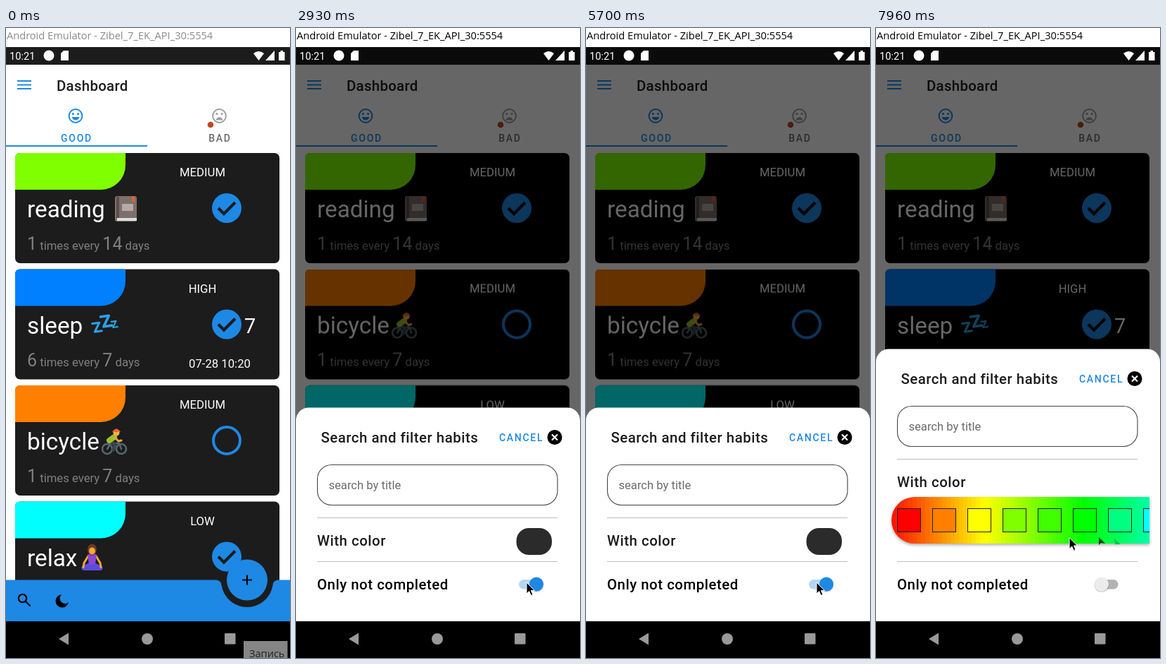
These frames come from a looping animation (404 px wide and 892 px high, 7.99 s). An HTML page:

```html
<!DOCTYPE html>
<html lang="en">
<head>
<meta charset="utf-8">
<title>Habit dashboard</title>
<style>
html, body { margin: 0; width: 100%; height: 100%; overflow: hidden; background: #fff; }
svg { display: block; width: 404px; height: 892px; font-family: Roboto, sans-serif; }
.mid { text-anchor: middle; }
.label { font-size: 16.7px; fill: #fff; }
.name { font-size: 33.3px; fill: #fff; }
.rate { font-size: 16.7px; fill: #808080; }
.rate .n { font-size: 25px; }
.caps { font-size: 14px; font-weight: 500; letter-spacing: 1.7px; }
.head { font-size: 20.4px; font-weight: 500; letter-spacing: .52px; fill: #1c1c1e; }
.desktop { font-family: 'Open Sans', sans-serif; font-size: 14.6px; }
.line { fill: none; stroke: currentColor; stroke-linecap: round; stroke-linejoin: round; }
.blue { color: #1e88e5; }
#palette { filter: drop-shadow(0 2px 2px #0005); }
#click { mix-blend-mode: multiply; }
</style>
</head>
<body>
<svg id="stage" viewBox="0 0 404 892"></svg>
<script>
const LOOP = 7990, BLUE = '#1e88e5', DARK = '#1c1c1c';
const repeat = (count, draw) => Array.from({ length: count }, (_, i) => draw(i)).join('');

const face = (x, y, mouth, color) => `<g transform="translate(${x} ${y})" color="${color}" fill="${color}">
  <circle class="line" r="9.4" stroke-width="2"/>
  <circle cx="-3.6" cy="-3" r="1.6"/><circle cx="3.6" cy="-3" r="1.6"/><path d="${mouth}"/></g>`;

const check = `<g class="blue"><circle cx="314" cy="78" r="21" fill="${BLUE}"/>
  <path class="card" d="M302 78L310 86L326 70" fill="none" stroke="${DARK}" stroke-width="4.2"/></g>`;
const ring = `<circle cx="314" cy="78" r="19" fill="none" stroke="${BLUE}" stroke-width="4"/>`;

const book = `<g transform="translate(154 60)"><rect x="1" y="1" width="31" height="36" rx="3" fill="#7d706b"/>
  <path d="M4 32H32V36H4Z" fill="#dedede"/><path d="M3 2H7V32H3Z" fill="#5a4f4b"/>
  <path d="M11 12H27V22H11Z" fill="#b5aaa5"/><path d="M25 1H29V10L27 8L25 10Z" fill="#e65f2b"/></g>`;
const zed = (x, y, size) => `<path stroke-width="${size / 3.3}" d="M${x} ${y}h${size}l${-size * .8} ${size * 1.2}h${size}"/>`;
const zzz = `<g class="line" color="#2d9fe3" transform="rotate(-8 138 78)">${zed(123, 75, 10)}${zed(136, 67, 12)}${zed(150, 76, 7)}</g>`;
const bike = `<g transform="translate(136 61)"><g class="line" color="#58666e" stroke-width="2.6">
  <circle cx="8" cy="29" r="7"/><circle cx="28" cy="29" r="7"/><path d="M8 29L13 21H25L28 29"/></g>
  <path class="line" color="#37474f" stroke-width="5" d="M11 19L19 22L17 30"/>
  <path class="line" color="#9bbf2e" stroke-width="8" d="M18 12L11 17"/>
  <path class="line" color="#f2a43c" stroke-width="3" d="M19 13L24 18L28 17"/>
  <circle cx="21" cy="6" r="4.6" fill="#f0b04a"/><path d="M15 5Q21 -4 27 5Z" fill="#f0642d"/></g>`;
const yoga = `<g transform="translate(106 61)"><path class="line" color="#5b4be0" stroke-width="7" d="M16 28L5 33H28Z"/>
  <path class="line" color="#f2a83b" stroke-width="3" d="M11 16L5 26L4 32M22 16L28 26L29 32"/>
  <path d="M10 14Q16 11 23 14L21 28H12Z" fill="#8a45d8"/>
  <ellipse cx="16.5" cy="7" rx="6.5" ry="8" fill="#6a3b22"/><ellipse cx="16.5" cy="9" rx="4.5" ry="5" fill="#f2a83b"/></g>`;

const card = (row, color, name, level, emoji, mark, times, days, extra = '') => `
<g transform="translate(0 ${177 + row * 164.5})">
  <rect class="card" x="13" width="376" height="156" rx="7" fill="${DARK}"/>
  <path d="M13 52V7Q13 0 20 0H170V17A35 35 0 0 1 135 52Z" fill="${color}"/>
  <text class="label mid" x="279.5" y="33">${level}</text>
  <text class="name" x="30" y="91">${name}</text>${emoji}${mark}
  <text class="rate" x="30" y="137"><tspan class="n">${times}</tspan> times every <tspan class="n">${days}</tspan> days</text>${extra}
</g>`;

const strips = repeat(62, i =>
  `<rect x="${22 + i * 6}" y="664" width="6.5" height="66" fill="hsl(${5 + i * 2.55} 100% 50%)"/>`);
const swatchHue = i => i < 4 ? i * 30 : i === 4 ? 105 : (i - 1) * 30;
const swatches = repeat(8, i =>
  `<rect x="${30.5 + i * 50}" y="680.5" width="33" height="33" fill="hsl(${swatchHue(i)} 100% 50%)" stroke="#222"/>`);

const rule = y => `<path d="M30 ${y}H372" stroke="#bdbdbd"/>`;

stage.innerHTML = `
<rect width="404" height="892" fill="#fff"/>
<g stroke="${BLUE}" stroke-width="2">${repeat(3, i => `<path d="M16 ${75 + i * 5.5}h20"/>`)}<path d="M0 167H201"/></g>
<text class="head" x="72" y="89" style="letter-spacing:.3px">Dashboard</text>
${face(99, 124.5, 'M-5.5 1.5H5.5Q3.8 6 0 6T-5.5 1.5', BLUE)}
${face(303.5, 124.5, 'M-5 6Q-3.6 1.8 0 1.8T5 6Z', '#9e9e9e')}
<circle cx="291" cy="137" r="4.3" fill="#bf4a1c"/>
<text class="caps mid" x="100.5" y="161" fill="${BLUE}">GOOD</text>
<text class="caps mid" x="304.5" y="161" fill="#6b6b6b">BAD</text>
${card(0, '#80ff00', 'reading', 'MEDIUM', book, check, 1, 14)}
<g id="sleep">${card(1, '#0080ff', 'sleep', 'HIGH', zzz, check, 6, 7,
  '<text class="name" x="339" y="90" style="font-size:29px">7</text><text class="label mid" x="304" y="139.5">07-28 10:20</text>')}</g>
<g id="rest">${card(2, '#ff8000', 'bicycle', 'MEDIUM', bike, ring, 1, 7)}
${card(3, '#00ffff', 'relax', 'LOW', yoga, check, 1, 7)}</g>
<path d="M0 781.5H299Q306 782 306.5 789A37 37 0 0 0 379.5 789Q380 782 387 781.5H404V840H0Z" fill="${BLUE}"/>
<circle cx="343" cy="781.5" r="29" fill="${BLUE}"/>
<path d="M336 781.5h14M343 774.5v14" stroke="#000" stroke-width="2"/>
<circle id="ripple" cx="25.5" cy="811" r="21"/>
<g class="line" color="#000" stroke-width="2.2"><circle cx="23.5" cy="807.5" r="5.7"/><path d="M28 812L34 818"/></g>
<path d="M79 802A9.3 9.3 0 1 0 89 813A7 7 0 0 1 79 802"/>
<rect y="27" width="404" height="25" fill="${DARK}"/>
<rect id="scrim" y="27" width="404" height="865"/>
<g fill="#fff">
  <text x="5" y="45" font-size="14.6">10:21</text>
  <circle cx="61" cy="39" r="7.5"/>
  <path d="M82 32H89V46H78V36Z"/>
  <path d="M352 36Q359.5 30 367 36L359.5 46Z"/><path d="M382 32V46H369Z"/>
  <path d="M388 34H390.5V32H394V34H396.5V46H388Z"/>
</g>
<rect y="840" width="404" height="52"/>
<g fill="#999"><path d="M75 865L89 856.5V873.5Z"/><circle cx="201" cy="865" r="8"/><rect x="311" y="857" width="15.5" height="15.5" rx="1"/></g>

<g id="sheet">
  <rect y="565" width="404" height="275" fill="#fff"/>
  <g id="upper">
    <rect y="537.5" width="404" height="200" rx="18" fill="#fff"/>
    <text class="head" x="35.5" y="587">Search and filter habits</text>
    <text class="caps" x="289" y="585" fill="${BLUE}">CANCEL</text>
    <circle cx="368" cy="579.5" r="10.5"/>
    <path d="M364 575.5l8 8m0-8l-8 8" stroke="#fff" stroke-width="2.2"/>
    <rect x="30.5" y="618.5" width="341.5" height="57" rx="20" fill="#fff" stroke="#444" stroke-width="1.1"/>
    <text x="46.5" y="653" font-size="16.6" fill="#6b6b6b">search by title</text>
    ${rule(693.5)}
    <text class="head" x="30" y="733">With color</text>
  </g>
  <rect id="pill" x="313.5" y="708" width="50.5" height="38" rx="18" fill="#2b2b2b"/>
  <clipPath id="bar"><path d="M389 664H55A33 33 0 0 0 55 730H389Z"/></clipPath>
  <g id="palette"><g clip-path="url(#bar)">${strips}${swatches}</g></g>
  ${rule(755.5)}
  <text class="head" x="30" y="795" style="fill:#000">Only not completed</text>
  <rect id="track" x="317" y="781" width="27.5" height="13.5" rx="6.75" fill="#b2b2b2"/>
  <g id="thumb"><circle cx="321" cy="788.5" r="10.5" opacity=".18"/><circle id="knob" cx="321" cy="787.5" r="10"/></g>
</g>

<g id="ghosts"><path d="M317 721l9 9l-6-1l-3 3Z" fill="#0a3d16"/><path d="M339 723l9 8h-8Z" fill="#0bc257"/></g>
<g id="tip"><rect x="338" y="868" width="62.5" height="24" fill="#858585"/>
  <text class="desktop" x="346" y="891" fill="#222">Запись</text></g>
<path id="cursor" d="M0 0V16L3.7 12.5L6.3 18.5L9 17.3L6.4 11.5H11.3Z" stroke="#fff"/>
<circle id="click" cx="-1" cy="-1" r="15" fill="#f8ef62"/>
<rect width="404" height="27" fill="#fff"/>
<text id="title" class="desktop" x="1" y="16">Android Emulator - Zibel_7_EK_API_30:5554</text>`;

// Each move is [start ms, duration ms, value, easing]; values hold in between.
function play(selector, prop, first, moves) {
  const frames = [{ offset: 0, [prop]: first }];
  let last = first;
  for (const [start, span, value, easing = 'linear'] of moves) {
    frames.push({ offset: start / LOOP, [prop]: last, easing }, { offset: (start + span) / LOOP, [prop]: value });
    last = value;
  }
  frames.push({ offset: 1, [prop]: last });
  for (const el of document.querySelectorAll(selector)) {
    el.animate(frames, { duration: LOOP, iterations: Infinity });
  }
}
const at = (x, y) => `translate(${x}px, ${y}px)`;

play('#title', 'fill', '#8a8a8a', [[40, 0, '#000']]);
play('#tip', 'opacity', 1, [[90, 0, 0]]);

const OPEN = 1080, EXPAND = 7490;
play('#ripple', 'opacity', 0, [[940, 100, .15], [1200, 200, 0]]);
play('#scrim', 'opacity', 0, [[OPEN, 350, .6, 'ease-in']]);
play('rect.card', 'fill', DARK, [[OPEN, 350, '#000', 'ease-in']]);
play('path.card', 'stroke', DARK, [[OPEN, 350, '#000', 'ease-in']]);
play('#sheet', 'opacity', 0, [[OPEN, 250, 1]]);
play('#sheet', 'transform', at(0, 155), [[OPEN, 350, at(0, 0), 'cubic-bezier(.2, .25, .4, 1)']]);
play('#upper', 'transform', at(0, 0), [[EXPAND, 0, at(0, -83)]]);
play('#pill', 'opacity', 1, [[EXPAND, 0, 0]]);
play('#palette', 'opacity', 0, [[EXPAND, 0, 1]]);
play('#ghosts', 'opacity', 0, [[7960, 0, 1]]);

// Taps on the switch turn it on and off in turn; the list follows.
const taps = [2520, 4080, 5380, 6630];
const toggle = (selector, prop, off, on, delay, span) =>
  play(selector, prop, off, taps.map((ms, i) => [ms + delay, span, i % 2 ? off : on, 'ease-in-out']));

toggle('#thumb', 'transform', at(0, 0), at(21, 0), 130, 160);
toggle('#knob', 'fill', '#ececec', BLUE, 130, 160);
toggle('#track', 'fill', '#b2b2b2', '#b4d6f4', 130, 160);
toggle('#sleep', 'opacity', 1, 0, 250, 0);
toggle('#rest', 'transform', at(0, 0), at(0, -164.5), 250, 0);

play('#click', 'opacity', 0, [870, ...taps, 7360].flatMap(ms => [[ms, 0, 1], [ms + 130, 90, 0]]));

for (const pointer of ['#cursor', '#click']) {
  play(pointer, 'transform', at(425, 910), [
    [90, 720, at(24, 814), 'ease-in-out'],
    [1010, 550, at(22, 866), 'cubic-bezier(.1, .6, .3, 1)'],
    [1640, 350, at(150, 876), 'ease-in'],
    [1990, 500, at(328, 785), 'ease-out'],
    [3370, 200, at(328, 793), 'ease-in-out'],
    [3570, 200, at(328, 785), 'ease-in-out'],
    [6900, 450, at(339, 722), 'ease-in-out'],
    [7910, 0, at(317, 722)],
    [7960, 0, at(275, 721.5)]
  ]);
}
</script>
</body>
</html>
```
